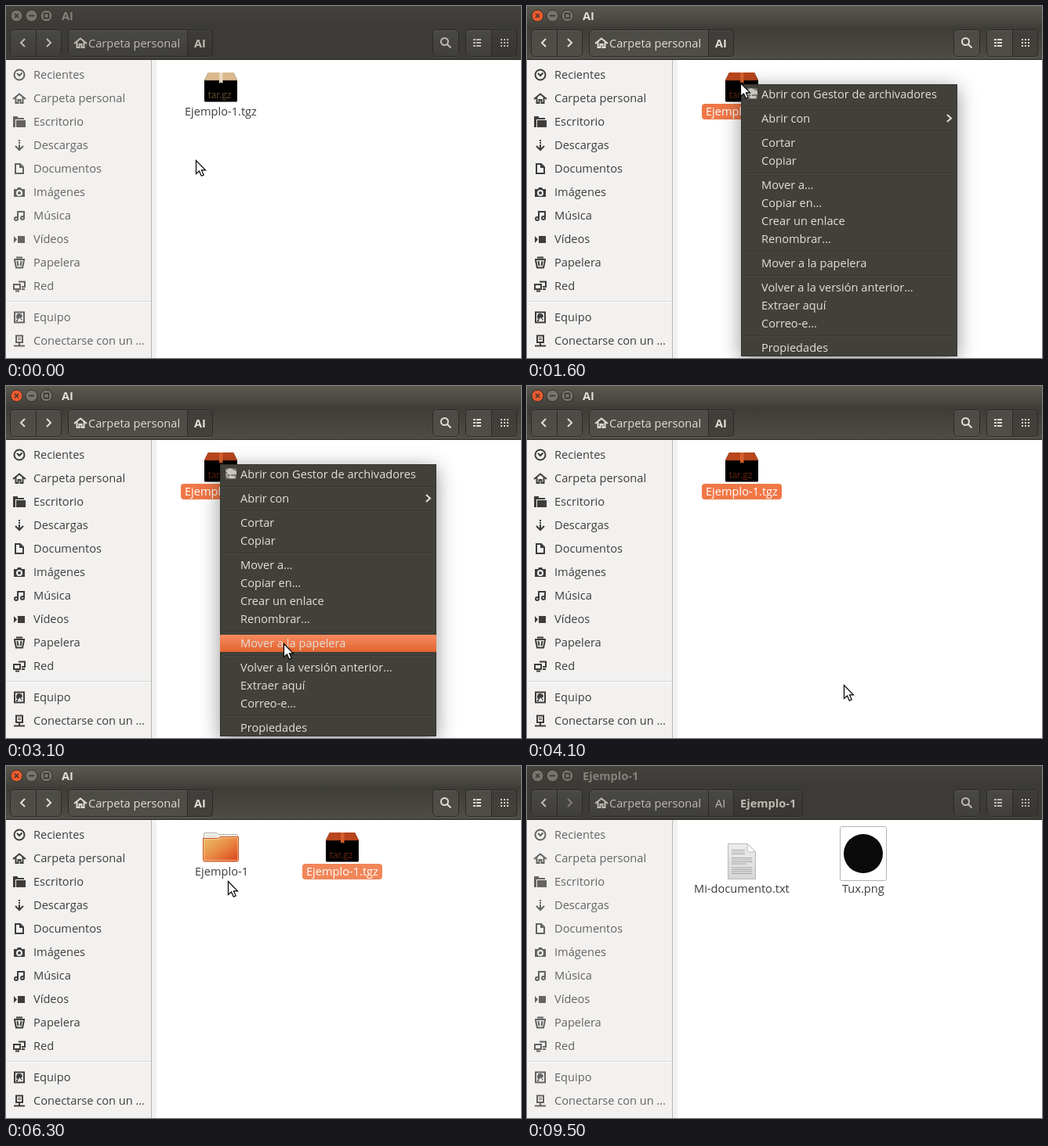
An HTML page for the animation above (9800 ms loop, 657x450 px).

```html
<!DOCTYPE html>
<html lang="es">
<head>
<meta charset="utf-8">
<title>Extraer aquí</title>
<style>
html, body { margin: 0; width: 100%; height: 100%; overflow: hidden; background: #fff; }
svg { display: block; font: 14.6px "Open Sans", "Noto Sans", sans-serif; --ink: #3e3d3b; --bar: #e2ded6; --title: #e2ded6; }
svg.backdrop { --ink: #656462; --bar: #bdbab3; --title: #85827b; }
text { white-space: pre; }
.b { font-weight: bold; }
.side { color: var(--ink); fill: currentColor; }
.bar { color: var(--bar); fill: currentColor; }
.line { fill: none; stroke: currentColor; stroke-width: 2; }
.solid { fill: currentColor; fill-rule: evenodd; stroke: none; }
.edge { fill: none; stroke: #2b2a27; }
.backdrop .focus, svg:not(.backdrop) .blur { display: none; }
.hover { filter: brightness(1.12); }
.pill { fill: #f07746; display: none; }
.name { fill: #3c3c3c; }
.selected .pill { display: inline; }
.selected .name { fill: #fff; }
.tgz { --lid: #d9b98d; --top: #c8a271; --low: #a98558; --tape: #eadcc3; --mark: #5d482a; }
.tgz.selected { --lid: #b9461d; --top: #c64f23; --low: #96390f; --tape: #d4602f; --mark: #5c210d; }
#menu { filter: drop-shadow(0 5px 13px rgba(0, 0, 0, .42)); }
</style>
</head>
<body>
<svg id="stage" width="657" height="450" viewBox="0 0 657 450">
  <defs>
    <linearGradient id="gTitle" x2="0" y2="1"><stop stop-color="#5b5950"/><stop offset="1" stop-color="#403f3a"/></linearGradient>
    <linearGradient id="gTool" x2="0" y2="1"><stop stop-color="#3d3c37"/><stop offset="1" stop-color="#4f4d46"/></linearGradient>
    <linearGradient id="gBlur" x2="0" y2="1"><stop stop-color="#43423d"/><stop offset=".35" stop-color="#3c3b37"/></linearGradient>
    <linearGradient id="gButton" x2="0" y2="1"><stop stop-color="#fff" stop-opacity=".07"/><stop offset="1" stop-color="#fff" stop-opacity=".02"/></linearGradient>
    <linearGradient id="gHot" x2="0" y2="1"><stop stop-color="#f78a60"/><stop offset="1" stop-color="#e1642f"/></linearGradient>
    <linearGradient id="gBox" x2="0" y2="1"><stop stop-color="var(--top)"/><stop offset="1" stop-color="var(--low)"/></linearGradient>
    <linearGradient id="gFolder" x2="1" y2="1"><stop stop-color="#e9c46c"/><stop offset=".45" stop-color="#e99048"/><stop offset="1" stop-color="#dc4419"/></linearGradient>
    <linearGradient id="gPage" x2="0" y2="1"><stop stop-color="#ededed"/><stop offset="1" stop-color="#d6d6d6"/></linearGradient>
  </defs>
  <rect width="657" height="450" fill="#fff"/>

  <g id="header">
    <g class="focus"><rect width="657" height="27" fill="url(#gTitle)"/><rect y="27" width="657" height="42" fill="url(#gTool)"/></g>
    <rect class="blur" width="657" height="69" fill="url(#gBlur)"/>
    <rect y="68" width="657" height="1" fill="#2d2c29"/>
    <g fill="none" stroke="#2f2e2a">
      <circle class="focus" cx="13.5" cy="12.5" r="7.5" fill="#ea5b2f"/>
      <circle class="blur" cx="13.5" cy="12.5" r="7.5" fill="#77746c"/>
      <circle cx="32.500" cy="12.500" r="7.500" fill="#77746c"/><circle cx="51.500" cy="12.500" r="7.500" fill="#77746c"/>
      <path d="m11 10 5 5m0-5-5 5M29 12.500h7M48.500 9.500h6v6h-6z" stroke-width="1.300"/>
    </g>
    <text id="title" class="b" x="71" y="18" fill="var(--title)"></text>
  </g>
  <g id="tools" class="bar"></g>
  <g id="places" class="side"></g>
  <g id="files"></g>
  <g id="menu"></g>
  <path id="cursor" d="M.5.500V17.500L4.500 14 7.300 20.300 10.200 19 7.500 12.900H12.500Z" fill="#fff" stroke="#000" stroke-width="1.200"/>
</svg>

<script>
const $ = id => document.getElementById(id);
const text = (x, y, s, attrs = '') => `<text x="${x}" y="${y}" ${attrs}>${s}</text>`;
const icon = (x, y, line, solid = '') =>
  `<g transform="translate(${x} ${y})"><path class="line" d="${line}"/><path class="solid" d="${solid}"/></g>`;
const HOME = 'M-8 1 0-5.500 8 1M-4.500-1V6H-1.500V2H1.500V6H4.500V-1';

// Toolbar: a button group is a frame with dividers; one cell may look pressed
function group(edges, pressed = -1) {
  const left = edges[0], width = edges.at(-1) - left;
  const frame = (y, style) => `<rect x="${left + .5}" y="${y}" width="${width - 1}" height="34" rx="4.500" ${style}/>`;
  const cell = pressed < 0 ? '' :
    `<rect x="${edges[pressed]}" y="31" width="${edges[pressed + 1] - edges[pressed]}" height="33" fill="#25241f" opacity=".3"/>`;
  const dividers = edges.slice(1, -1).map(x => `<path class="edge" d="M${x}.5 31V64"/>`).join('');
  return frame(31.5, 'fill="none" stroke="#fff" stroke-opacity=".09"') + frame(30.5, 'fill="url(#gButton)"') +
    cell + dividers + frame(30.5, 'class="edge"');
}
const dots = (xs, w) => xs.map(x => [-5, -1, 3].map(y => `M${x} ${y}h${w}v2h-${w}z`).join('')).join('');

$('tools').innerHTML = group([5, 38, 71]) + group([544, 578]) + group([586, 619, 652], 1) +
  icon(21, 47, 'M3-5-2 0 3 5') +
  `<g id="forward">${icon(54, 47, 'M-2-5 3 0-2 5')}</g>` +
  icon(561, 47, 'M3-1.500A4.500 4.500 0 1 1-6-1.500 4.500 4.500 0 1 1 3-1.500M1.500 1.500 6.500 6.500') +
  icon(601, 47, '', dots([-5], 3) + dots([-1], 6)) +
  icon(636, 47, '', dots([-5, -1, 3], 2)) +
  `<g id="pathHome">${group([79, 231, 264], 1)}${text(240, 53, 'AI', 'class="b"')}</g>` +
  `<g id="pathFolder">${group([79, 231, 263, 352], 2)}${text(240, 53, 'AI')}${text(272, 53, 'Ejemplo-1', 'class="b"')}</g>` +
  icon(95, 47, HOME) + text(105, 53, 'Carpeta personal');

// Sidebar
const places = [
  ['Recientes', 'M6.500 0A6.500 6.500 0 1 1-6.500 0 6.500 6.500 0 1 1 6.500 0M-3-2 0 1 3.500-2.500'],
  ['Carpeta personal', HOME],
  ['Escritorio', '', 'M-8-7H-2V-5H6V-3H-5V7H-8ZM-4-2H8V7H-4Z'],
  ['Descargas', 'M0-7v2M0-4v2M0-1V6M-5 1 0 6 5 1'],
  ['Documentos', 'M-5-6H1L5-2V6H-5Z', 'M0-6V-1H5Z'],
  ['Imágenes', '', 'M-7-4H-3L-2-6H2L3-4H7V6H-7ZM4 1A4 4 0 1 0-4 1 4 4 0 1 0 4 1M2 1A2 2 0 1 1-2 1 2 2 0 1 1 2 1'],
  ['Música', 'M-2 4V-5H6V3M-2 4A2 2 0 1 1-6 4 2 2 0 1 1-2 4M6 3A2 2 0 1 1 2 3 2 2 0 1 1 6 3'],
  ['Vídeos', '', 'M-2-4H7V5H-2ZM-7-4-3 .500-7 5Z'],
  ['Papelera', 'M-7-4H7M-4-6.500H4M-6-3-4 6.500H4L6-3M-2.500-2-1.500 4M2.500-2 1.500 4'],
  ['Red', 'M-1-5.500H7V1H3M-7-2H1V4H-7ZM-5 6.500H0', 'M3 3H7V5H3Z'],
  ['Equipo', 'M-6-6.500H6V6.500H-6Z', 'M4-1A4 4 0 1 0-1 3L0 0 3 4 4 3 2 1ZM-4 3h2v2h-2z'],
  ['Conectarse con un …', 'M-4-6.500H4V2H-4ZM0 2V6M-7 6.500H7', 'M-2-4H2V-3H-2ZM-2-2H2V-1H-2Z'],
];
$('places').innerHTML = `<path fill="#f2f1f0" d="M0 69H192V450H0Z"/>
  <path d="M185.500 69V450" stroke="#b8b5b2"/><path d="M0 377.500H185" stroke="#d8d5d2"/><path d="M0 378.500H185" stroke="#fff"/>` +
  places.map(([label, line, solid], i) => {
    const y = 88 + 30 * i + (i > 9 ? 10 : 0);
    return icon(17, y, line, solid) + text(35, y + 5, label);
  }).join('');

// Files
const pageLines = [...Array(13).keys()].filter(i => i != 3 && i != 8)
  .map(i => `M261 ${107.5 + 2.500 * i}H${i < 3 ? 278 : i == 7 ? 280 : 287}`).join('');
$('files').innerHTML = `
  <g id="parent">
    <g id="folder" style="--pillw:82px">
      <g class="art">
        <path d="M252.500 92V87q0-1.500 1.500-1.500H269l2 2H294q1.500 0 1.500 1.500V95H252.500Z" fill="#f1efec" stroke="#b9b3aa"/>
        <path d="M255 89.500H269" stroke="#d9d5cf"/>
        <path d="M251.500 92.500H271L273 90.500H296.500V120q0 2-2 2H253.500q-2 0-2-2Z" fill="url(#gFolder)" stroke="#c9501f"/>
        <path d="M252.500 93.500H272L274 91.500H295.500V120.500H252.500Z" fill="none" stroke="#fbe1b8" stroke-opacity=".6"/>
      </g>
      <rect class="pill" x="236" y="125" width="78" height="20" rx="4"/>${text(241, 140, 'Ejemplo-1', 'class="name"')}
    </g>
    <g id="archive" class="tgz">
      <g class="art">
        <path d="M258 85H290L295 95V121q0 1.500-1.500 1.500H254.500Q253 122.500 253 121V95Z" fill="url(#gBox)"/>
        <path d="M258 85H290L295 95H253Z" fill="var(--lid)"/>
        <path d="M253 95H295" stroke="var(--low)" stroke-opacity=".5"/>
        <path d="M272 85H276.500V99L274 97.500 272 99Z" fill="var(--tape)"/>
        ${text(257.5, 118, 'tar.gz', 'fill="var(--mark)" font-size="12.500" font-family="Lato, sans-serif"')}
      </g>
      <rect class="pill" x="223" y="125" width="102" height="20" rx="4"/>${text(228, 140, 'Ejemplo-1.tgz', 'class="name"')}
    </g>
  </g>
  <g id="inside">
    <g id="note">
      <path d="M256.500 99.500H281L291.500 110V144.500H256.500Z" fill="url(#gPage)" stroke="#b9b9b9"/>
      <path d="${pageLines}" stroke="#a8a8a8"/>
      <path d="M281 99.500V108q0 2 2 2H291.500Z" fill="#fafafa" stroke="#b9b9b9"/>
    </g>
    ${text(213, 162, 'Mi-documento.txt', 'class="name"')}
    <rect x="399.500" y="77.500" width="59" height="69" rx="2" fill="#fff" stroke="#b4b4b4"/>
    <circle cx="429" cy="112" r="25" fill="#0b0b0b"/>
    ${text(402, 162, 'Tux.png', 'class="name"')}
  </g>`;

// Context menu; an empty entry is a separator
const entries = ['Abrir con Gestor de archivadores', '', 'Abrir con', '', 'Cortar', 'Copiar', '', 'Mover a…', 'Copiar en…',
  'Crear un enlace', 'Renombrar…', '', 'Mover a la papelera', '', 'Volver a la versión anterior…', 'Extraer aquí',
  'Correo-e…', '', 'Propiedades'];
let rowTop = 102;
const rows = [];
let menuText = '';
for (const label of entries) {
  if (label) {
    rows.push(rowTop);
    menuText += text(299, rowTop + 16, label);
  } else {
    menuText += `<path d="M278 ${rowTop + 3.5}H544" stroke="#383732"/><path d="M278 ${rowTop + 4.5}H544" stroke="#484740"/>`;
  }
  rowTop += label ? 23 : 8;
}
$('menu').innerHTML = `<rect x="273.500" y="100.500" width="275" height="347" fill="#41403a" stroke="#34332e"/>
  <rect id="hot" x="273" width="276" height="22" fill="url(#gHot)"/>
  <g fill="#e4e0d8">${menuText}</g>
  <path d="M536 139 541 143.500 536 148" fill="none" stroke="#e4e0d8" stroke-width="2"/>
  <rect x="280" y="105" width="14" height="14" rx="2" fill="#77756f"/>
  <path d="M280 108 286 105 294 109V113H284ZM285 115H292V118H285Z" fill="#c9c6be"/>
  <circle cx="284" cy="114" r="2.500" fill="none" stroke="#e0ddd5"/>`;

// Cursor trips: first step, last step, destination
const trips = [
  [500, 1400, 272, 98], [2200, 3100, 354, 329], [3200, 3500, 404, 382], [5400, 6300, 283, 147],
  [6400, 6700, 275, 104], [7200, 7500, 347, 213], [8100, 8600, 85, -8],
];
function cursorAt(t) {
  let x = 242, y = 197;
  for (const [start, end, toX, toY] of trips) {
    if (t < start) break;
    const p = Math.min(1, (t - start + 100) / (end - start + 100));
    const eased = p * p * (3 - 2 * p);
    x += (toX - x) * eased;
    y += (toY - y) * eased;
  }
  return [Math.round(x), Math.round(y)];
}

const show = (id, on) => $(id).style.display = on ? '' : 'none';
const within = (x, y, left, top, right, bottom) => x >= left && x <= right && y >= top && y <= bottom;

function draw(now) {
  const t = Math.floor(now % 9800 / 100) * 100;
  const [x, y] = cursorAt(t);
  const extracted = t >= 4600, opened = t >= 6900, clicked = t >= 6800;
  const menuOpen = t >= 1600 && t < 4100;

  $('stage').classList.toggle('backdrop', t < 1500 || t >= 9500);
  $('title').textContent = opened ? 'Ejemplo-1' : 'AI';
  $('forward').style.opacity = opened ? .5 : 1;
  show('pathHome', !opened);
  show('pathFolder', opened);

  show('parent', !opened);
  show('inside', opened);
  show('folder', extracted);
  $('archive').setAttribute('transform', `translate(${extracted ? 155 : 0} 0)`);
  $('archive').classList.toggle('selected', t >= 1500 && !clicked);
  $('archive').querySelector('.pill').style.fill = extracted ? '#f28659' : '';
  $('folder').classList.toggle('selected', clicked);
  const overIcon = within(x, y, 251, 85, 297, 122);
  $('archive').querySelector('.art').classList.toggle('hover', t < 1500 && overIcon);
  $('folder').querySelector('.art').classList.toggle('hover', overIcon);
  $('note').classList.toggle('hover', within(x, y, 256, 99, 292, 145));

  show('menu', menuOpen);
  const row = x >= 273 ? rows.find(top => y >= top && y < top + 23) : undefined;
  show('hot', row !== undefined);
  if (row !== undefined) $('hot').setAttribute('y', row);

  $('cursor').setAttribute('transform', `translate(${x} ${y})`);
  show('cursor', t < 8700);
}

const began = performance.now();
(function tick() {
  draw(performance.now() - began);
  requestAnimationFrame(tick);
})();
</script>
</body>
</html>
```
